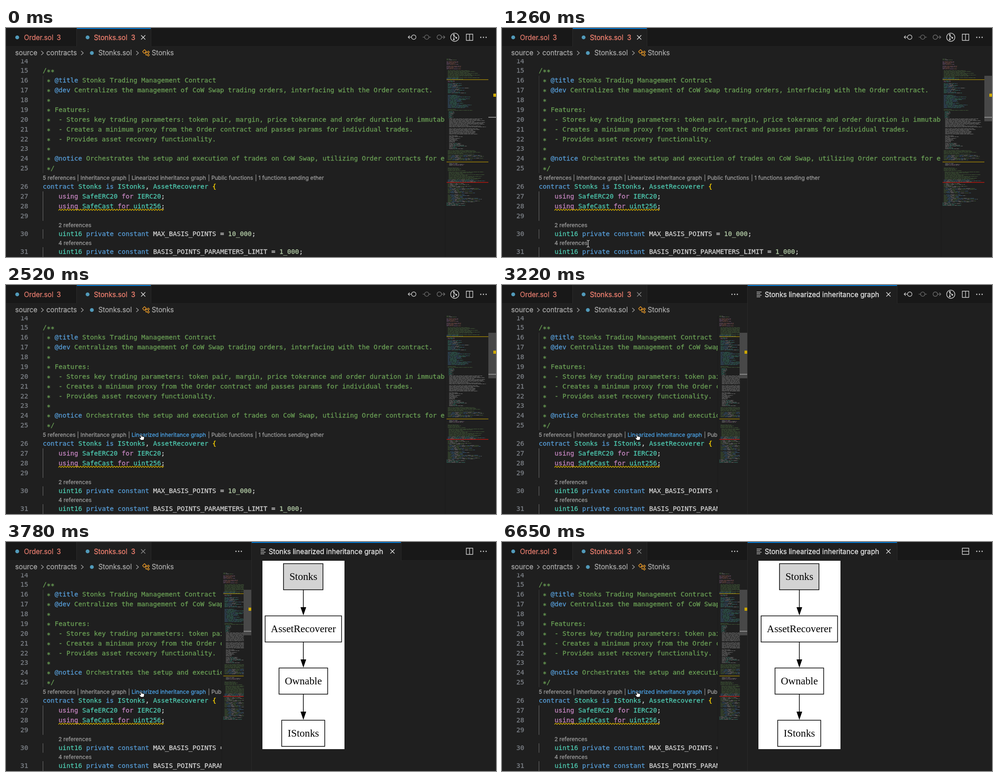
An HTML page with a canvas that plays this animation: 1093x513 px, repeating every 6860 ms.

```html
<!DOCTYPE html>
<html lang="en">
<head>
<meta charset="utf-8">
<title>Contract editor</title>
<style>
html, body { margin: 0; width: 100%; height: 100%; overflow: hidden; background: #1f1f1f; }
canvas { display: block; width: 1093px; height: 513px; }
</style>
</head>
<body>
<canvas id="stage"></canvas>
<script>
const W = 1093, H = 513, LOOP = 6860, STEP = 70;
const SPLIT_AT = 3220, ICONS_AT = 3570, GRAPH_AT = 3640, ALT_AT = 6370;
const ENTER_AT = 1050;
const MONO = '14.6px "DejaVu Sans Mono", monospace';
const UI = '15.3px Inter, sans-serif';
const LENS = '12.3px Inter, sans-serif';
const SERIF = '22.9px "Liberation Serif", serif';
const CHAR = 8.795, LEFT = 82, TOP = 70;
const C = {
  bg: '#1f1f1f', bar: '#181818', line: '#2b2b2b', blue: '#0078d4', comment: '#6a9f55',
  key: '#569cd6', ctrl: '#c586c0', type: '#4ec9b0', text: '#d4d4d4', number: '#b5cea8',
  gold: '#ffd700', warn: '#cca700', error: '#d01810', lens: '#999999', link: '#4b9fe0',
  file: '#f08070', crumb: '#a9a9a9', icon: '#cccccc', dim: '#707070', badge: '#519aba', orange: '#ee9d28'
};

const canvas = document.getElementById('stage');
const g = canvas.getContext('2d');
const dpr = window.devicePixelRatio || 1;
canvas.width = W * dpr;
canvas.height = H * dpr;

// line number, vertical centre, text
const lines = [
  '', '/**', ' * @title Stonks Trading Management Contract',
  ' * @dev Centralizes the management of CoW Swap trading orders, interfacing with the Order contract.',
  ' *', ' * Features:',
  ' *  - Stores key trading parameters: token pair, margin, price tokerance and order duration in immutable',
  ' *  - Creates a minimum proxy from the Order contract and passes params for individual trades.',
  ' *  - Provides asset recovery functionality.', ' *',
  ' * @notice Orchestrates the setup and execution of trades on CoW Swap, utilizing Order contracts for each',
  ' */'
].map((s, i) => [14 + i, 73.6 + i * 21.87, s]).concat([
  [26, 355, 'contract Stonks is IStonks, AssetRecoverer {'],
  [27, 377, '    using SafeERC20 for IERC20;'],
  [28, 399, '    using SafeCast for uint256;'],
  [29, 421, ''],
  [30, 461, '    uint16 private constant MAX_BASIS_POINTS = 10_000;'],
  [31, 501, '    uint16 private constant BASIS_POINTS_PARAMETERS_LIMIT = 1_000;']
]);

const lenses = [
  [82, '5 references'], [166, 'Inheritance graph'], [280, 'Linearized inheritance graph'],
  [458, 'Public functions'], [563, '1 functions sending ether']
];
const links = { 1: [166, 269], 2: [280, 447] };

function rect(x, y, w, h, color) {
  g.fillStyle = color;
  g.fillRect(x, y, w, h);
}

// A hairline outline gives the slightly heavier strokes of smoothed screen text
function text(s, x, y, font, color, align = 'left') {
  g.font = font;
  g.fillStyle = g.strokeStyle = color;
  g.textAlign = align;
  g.lineWidth = 0.3;
  g.lineJoin = 'round';
  g.fillText(s, x, y);
  if (font !== SERIF) g.strokeText(s, x, y);
}

function stroke(points, color, width = 1.2) {
  g.beginPath();
  points.forEach(([x, y], i) => i ? g.lineTo(x, y) : g.moveTo(x, y));
  g.strokeStyle = color;
  g.lineWidth = width;
  g.stroke();
}

function ring(x, y, r, color, width = 1.3) {
  g.beginPath();
  g.arc(x, y, r, 0, Math.PI * 2);
  g.strokeStyle = color;
  g.lineWidth = width;
  g.stroke();
}

function dot(x, y, r, color) {
  g.beginPath();
  g.arc(x, y, r, 0, Math.PI * 2);
  g.fillStyle = color;
  g.fill();
}

function clipped(x, y, w, h, draw) {
  g.save();
  g.beginPath();
  g.rect(x, y, w, h);
  g.clip();
  draw();
  g.restore();
}

function cross(x, y, color) {
  stroke([[x - 4.7, y - 4.7], [x + 4.7, y + 4.7]], color, 1.4);
  stroke([[x + 4.7, y - 4.7], [x - 4.7, y + 4.7]], color, 1.4);
}

function dots(x, y) {
  for (const d of [-6, 0, 6]) dot(x + d, y, 1.4, C.icon);
}

function tokenColor(word) {
  if (/^(contract|is|private|constant)$/.test(word)) return C.key;
  if (/^(using|for)$/.test(word)) return C.ctrl;
  if (/^\d/.test(word)) return C.number;
  if (word === '{') return C.gold;
  if (/^(Stonks|IStonks|AssetRecoverer|Safe\w+|IERC20|uint\d+)$/.test(word)) return C.type;
  return C.text;
}

function codeLine(s, y) {
  const comment = /^ ?[*/]/.test(s);
  const parts = comment ? /\*|@\w+|[^*@]+/g : /\w+|[^\w\s]/g;
  for (const m of s.matchAll(parts)) {
    const color = !comment ? tokenColor(m[0]) : m[0][0] === '@' ? C.key : C.comment;
    text(m[0], LEFT + m.index * CHAR, y + (m[0] === '*' ? 3 : 0), MONO, color);
  }
}

function drawCode(right, hover) {
  clipped(0, TOP, right, H - TOP, () => {
    rect(LEFT, 107, 1, 218, '#3c3c3c');
    for (const [y, h] of [[366, 66], [451, 21], [491, 22]]) rect(LEFT, y, 1, h, '#707070');
    for (const [n, y, s] of lines) {
      text(n, 32, y + 5, MONO, '#7c8087');
      codeLine(s, y + 5);
    }
    lenses.forEach(([x, s], i) => {
      if (i) text('|', x - 7.5, 340, LENS, C.lens);
      text(s, x, 340, LENS, i === hover ? C.link : C.lens);
    });
    text('2 references', 117, 446, LENS, C.lens);
    text('4 references', 117, 486.3, LENS, C.lens);
    const wave = [];
    for (let x = 117; x <= 354; x += 2.9) wave.push([x, wave.length % 2 ? 405.8 : 408.8]);
    stroke(wave, C.warn, 1.5);
  });
}

// Minimap bands: top, bottom, indent, widest row, colours
const bands = [
  [69, 73, 0, 26, [C.comment, C.text]],
  [75, 83, 0, 44, [C.ctrl, '#ce7868', '#ce7868']],
  [85, 92, 0, 44, [C.ctrl, '#ce7868', '#ce7868']],
  [95, 112, 3, 78, [C.comment]],
  [112, 115, 0, 40, [C.key, C.type]],
  [118, 122, 3, 26, [C.ctrl, C.type]],
  [124, 135, 3, 52, [C.type, C.key, C.text]],
  [137, 147, 3, 46, [C.type, C.key, C.text]],
  [150, 180, 3, 56, [C.key, C.type, C.type]],
  [182, 186, 3, 60, [C.comment]],
  [187, 202, 5, 22, [C.type, C.text]],
  [203, 223, 6, 94, [C.text]],
  [225, 239, 6, 86, [C.text]],
  [241, 256, 6, 40, [C.text]],
  [258, 271, 6, 50, [C.text, C.text, C.type]],
  [274, 284, 3, 86, [C.comment]],
  [285, 297, 3, 84, [C.comment, C.key, C.text]],
  [303, 308, 6, 40, [C.text, C.ctrl]],
  [313, 321, 3, 60, [C.comment]],
  [322, 339, 5, 92, [C.comment]],
  [340, 345, 3, 92, [C.key, C.text, C.type]],
  [348, 357, 3, 58, [C.comment, C.text]],
  [359, 370, 3, 84, [C.comment, C.key, C.text]],
  [373, 390, 3, 84, [C.comment, C.key, C.text]],
  [391, 398, 0, 44, [C.type, C.text]]
];

function random(seed) {
  return () => (seed = (seed * 16807) % 2147483647) / 2147483647;
}

function drawMinimap(x0, width) {
  const rnd = random(4177);
  clipped(x0, 69, width, 335, () => {
    g.globalAlpha = 0.45;
    for (const [top, bottom, indent, widest, colors] of bands) {
      for (let y = top; y < bottom; y += 2) {
        const end = indent + (widest - indent) * (0.3 + 0.7 * rnd());
        for (let x = indent, k = 0; x < end; k++) {
          const w = Math.min(2 + rnd() * 8, end - x);
          rect(x0 + x, y, w, 1, colors[k % colors.length]);
          x += w + 1;
        }
      }
    }
    g.globalAlpha = 0.8;
    rect(x0, 115, width, 1.3, C.warn);
    rect(x0, 299.5, width, 1.3, C.warn);
    rect(x0, 345, width, 1.6, C.error);
    g.globalAlpha = 1;
  });
}

function drawRuler(x, width, alpha) {
  g.globalAlpha = alpha;
  rect(x, 107, width, 102, '#484848');
  g.globalAlpha = 1;
  rect(x + width - 6, 147, 6, 7, C.warn);
  rect(x, 199, width, 2, '#8a8a8a');
}

function chevron(x) {
  stroke([[x - 2.5, 51.5], [x + 2.5, 56], [x - 2.5, 60.5]], C.crumb, 1.3);
}

function classIcon() {
  stroke([[304.5, 53], [309, 48.5], [313, 52.5], [308.5, 57], [304.5, 53]], C.orange, 1.4);
  stroke([[311, 54.5], [315, 54.5]], C.orange, 1.4);
  stroke([[312, 54.5], [312, 60.5], [315, 60.5]], C.orange, 1.4);
  for (const y of [54, 60.5]) {
    stroke([[315, y], [317.5, y - 2.5], [320, y], [317.5, y + 2.5], [315, y]], C.orange, 1.3);
  }
}

function drawTabs(split) {
  rect(0, 0, W, 41, C.bar);
  rect(0, 41, W, 1, '#242424');
  rect(157, 0, 167, 42, C.bg);
  rect(157, 0, 1, 41, C.line);
  rect(323, 0, 1, 41, C.line);
  if (!split) rect(158, 0, 165, 2, C.blue);
  dot(25, 21, 4.3, C.badge);
  text('Order.sol', 40, 26.5, UI, '#e07a6c');
  text('3', 113, 26.5, UI, '#e07a6c');
  dot(182, 21, 4.3, C.badge);
  text('Stonks.sol', 196, 26.5, UI, C.file);
  text('3', 279, 26.5, UI, C.file);
  cross(306, 21, split ? '#8c8c8c' : '#e0e0e0');

  text('source', 20.5, 61.3, UI, C.crumb);
  chevron(81);
  text('contracts', 90, 61.3, UI, C.crumb);
  chevron(170);
  dot(191.5, 56, 4.3, C.badge);
  text('Stonks.sol', 206, 61.3, UI, C.crumb);
  chevron(293);
  classIcon();
  text('Stonks', 325, 61.3, UI, C.crumb);
}

function splitIcon(horizontal) {
  g.strokeStyle = C.icon;
  g.lineWidth = 1.4;
  g.strokeRect(1026.7, 13.7, 14.6, 14);
  stroke(horizontal ? [[1027, 20.7], [1041, 20.7]] : [[1034, 14], [1034, 28]], C.icon, 1.4);
}

function historyIcons() {
  const y = 20.5;
  ring(909.5, y, 5, C.icon);
  stroke([[904.5, y], [897, y]], C.icon, 1.3);
  stroke([[900.5, y - 3.5], [897, y], [900.5, y + 3.5]], C.icon, 1.3);
  ring(938.5, y, 4.8, C.dim);
  stroke([[929.5, y], [933.7, y]], C.dim, 1.3);
  stroke([[943.3, y], [947.5, y]], C.dim, 1.3);
  ring(966.5, y, 5, C.dim);
  stroke([[971.5, y], [979, y]], C.dim, 1.3);
  stroke([[975.5, y - 3.5], [979, y], [975.5, y + 3.5]], C.dim, 1.3);
  ring(1001, 20.7, 9.2, C.icon, 1.5);
  stroke([[999, 14], [999, 27]], C.icon, 1.3);
  stroke([[999, 17], [1004.5, 22]], C.icon, 1.3);
  for (const [x, cy] of [[999, 15.5], [999, 25.5], [1004.5, 22]]) dot(x, cy, 1.9, C.icon);
}

function node(label, x, y, w, h, fill) {
  rect(x, y, w, h, fill);
  g.strokeStyle = '#000';
  g.lineWidth = 1.5;
  g.lineJoin = 'miter';
  g.strokeRect(x, y, w, h);
  text(label, 663.3, y + 36.8, SERIF, '#000', 'center');
}

function drawGraph() {
  rect(572, 42, 183, 422, '#fff');
  node('Stonks', 619, 48.5, 88, 58.5, '#d3d3d3');
  node('AssetRecoverer', 578, 165.5, 170.5, 58.5, '#fff');
  node('Ownable', 609, 282.3, 108.5, 58.5, '#fff');
  node('IStonks', 615, 399.3, 96, 58.5, '#fff');
  for (const y of [107, 224, 341]) {
    stroke([[663.3, y], [663.3, y + 40]], '#000', 1.5);
    g.beginPath();
    g.moveTo(657, y + 39);
    g.lineTo(669.6, y + 39);
    g.lineTo(663.3, y + 57.5);
    g.closePath();
    g.fillStyle = '#000';
    g.fill();
  }
}

function drawPanel(t) {
  rect(547, 0, 1, H, C.line);
  rect(548, 0, 333, 42, C.bg);
  rect(548, 0, 333, 2, C.blue);
  rect(881, 0, 1, 41, C.line);
  [11, 8, 11, 8].forEach((w, i) => rect(568, 15 + i * 3.6, w, 1.3, C.icon));
  text('Stonks linearized inheritance graph', 586, 26.5, UI, '#e8e8e8');
  cross(862, 21, '#e0e0e0');
  dots(519, 21);
  if (t >= GRAPH_AT) drawGraph();
}

// Pointer path: time, x, y of the hot spot
const path = [[ENTER_AT, 178, 516], [1820, 256, 337], [2450, 301, 335]];

function pointer(t) {
  if (t < ENTER_AT) return null;
  for (let i = 1; i < path.length; i++) {
    const [t0, x0, y0] = path[i - 1], [t1, x1, y1] = path[i];
    if (t < t1) {
      const k = (t - t0) / (t1 - t0), e = k * k * (3 - 2 * k);
      return [x0 + (x1 - x0) * e, y0 + (y1 - y0) * e];
    }
  }
  return path[path.length - 1].slice(1);
}

function hovered(p) {
  if (!p || p[1] < 326 || p[1] > 345) return -1;
  const hit = Object.keys(links).find(i => p[0] >= links[i][0] && p[0] <= links[i][1]);
  return hit ? +hit : -1;
}

function drawHand(x, y) {
  g.save();
  g.translate(x, y);
  g.beginPath();
  g.moveTo(-1.6, 0.4);
  g.quadraticCurveTo(-0.2, -1.2, 1, 0.6);
  g.lineTo(1.9, 4.2);
  g.quadraticCurveTo(3.3, 3, 4.3, 4.4);
  g.quadraticCurveTo(5.7, 3.6, 6.3, 5);
  g.quadraticCurveTo(7.8, 4.7, 7.7, 6.6);
  g.quadraticCurveTo(7.6, 9.6, 6.3, 12.6);
  g.lineTo(-0.4, 12.6);
  g.quadraticCurveTo(-2, 9.8, -4, 7.8);
  g.quadraticCurveTo(-3.6, 5.8, -1.2, 7.2);
  g.lineTo(-0.5, 7.4);
  g.closePath();
  g.fillStyle = '#fff';
  g.strokeStyle = '#111';
  g.lineWidth = 1.2;
  g.lineJoin = 'round';
  g.fill();
  g.stroke();
  g.restore();
}

function drawBeam(x, y) {
  const beam = [[x - 3, y - 8], [x, y - 6.5], [x, y + 6.5], [x - 3, y + 8]];
  stroke(beam, '#ddd', 1.2);
  stroke([[x + 3, y - 8], [x, y - 6.5]], '#ddd', 1.2);
  stroke([[x + 3, y + 8], [x, y + 6.5]], '#ddd', 1.2);
}

function draw(t) {
  const split = t >= SPLIT_AT;
  const p = pointer(t), hover = hovered(p);
  const edge = split ? 547 : W;
  const codeEnd = split ? 481 : 979;
  const barAlpha = Math.max(0, Math.min(1, (t - ENTER_AT) / 140));
  g.setTransform(dpr, 0, 0, dpr, 0, 0);
  rect(0, 0, W, H, C.bg);
  drawTabs(split);
  drawCode(codeEnd, hover);
  rect(codeEnd, 69, 1, H - 69, '#191919');
  drawMinimap(codeEnd + 3.5, split ? 46 : 93.5);
  drawRuler(edge - 17, 17, barAlpha);
  if (split) drawPanel(t);
  if (t < ICONS_AT) historyIcons();
  splitIcon(t >= ALT_AT);
  dots(1065, 21);
  if (p) (hover < 0 ? drawBeam : drawHand)(...p);
}

const start = performance.now();
function tick() {
  const t = (performance.now() - start) % LOOP;
  draw(Math.floor(t / STEP) * STEP);
  requestAnimationFrame(tick);
}
tick();
</script>
</body>
</html>
```
